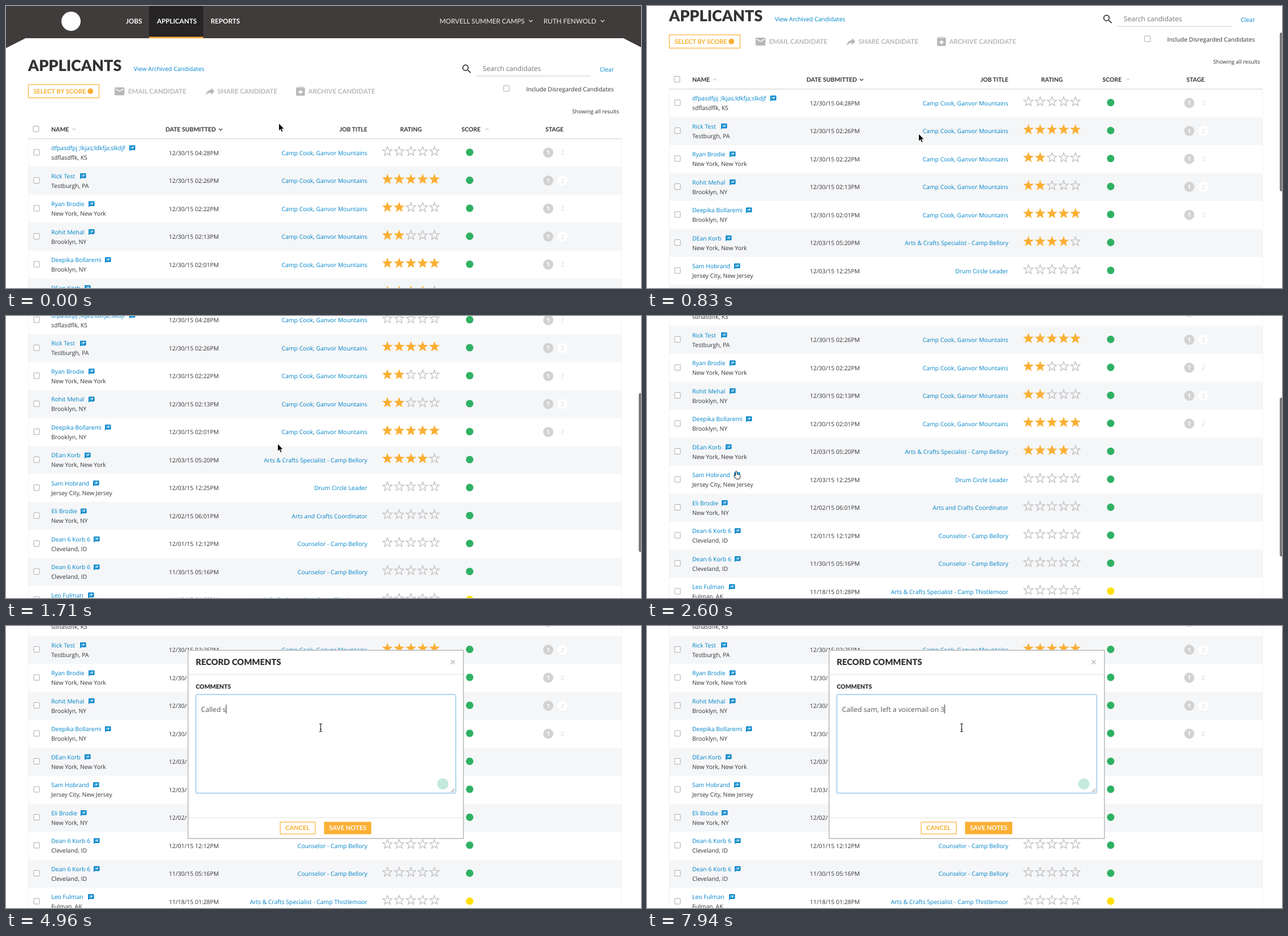
These frames come from a looping animation (1123 px wide and 499 px high, 8 s). An HTML page:

```html
<!DOCTYPE html>
<html lang="en">
<head>
<meta charset="utf-8">
<title>Applicants</title>
<style>
html, body { margin: 0; width: 100%; height: 100%; overflow: hidden; background: #fff; }
svg { display: block; width: 100vw; height: 100vh; }
text { font: 10.44px "Open Sans", sans-serif; fill: #333; white-space: pre; text-rendering: geometricPrecision; }
.link { fill: #0084c9; }
.big { font-size: 12.18px; fill: #777; }
.small { font-size: 9.57px; }
.typed { font-size: 12.18px; fill: #555; }
.h1, .h2, .h3, .nav, .user, .col, .tool, .btn { font-family: Lato, sans-serif; font-weight: 700; }
.h1 { font-size: 27px; font-weight: 900; }
.h2 { font-size: 14.8px; font-weight: 900; }
.h3 { font-size: 10.6px; font-weight: 900; }
.nav { font-size: 11.7px; fill: #fff; }
.user { font-size: 11.7px; font-weight: 400; fill: #eee; }
.col { font-size: 10.5px; }
.tool { font-size: 11.5px; fill: #b8b8b8; }
.btn { font-size: 11.1px; fill: #f9ae2d; }
.num { font-weight: 700; }
.line { fill: none; stroke-width: 1.2; }
</style>
</head>
<body>
<svg viewBox="0 0 1123 499">
  <g id="page"></g>
  <rect id="bar" x="1119" width="8" height="281" rx="3" fill="#7a7a7a"/>
  <g id="modal"></g>
  <g id="cursor">
    <path d="M0 0V13.5l3-2.8 2 4.8 2.3-1-2-4.6H9.5z" stroke="#fff" stroke-width=".8"/>
    <path d="M3.5 8V1.7a1.3 1.3 0 0 1 2.6 0V6l4.6 1q1.6.4 1.4 2.2L11.5 12l-1 2.5H5L1 9.5Q.4 8.5 1.4 8t2.1 1z" fill="#fff" stroke="#222"/>
    <path d="M-2.5-7Q0-7 0-5.5V5.5Q0 7-2.5 7M2.5-7Q0-7 0-5.5M0 5.5Q0 7 2.5 7M-1.5 2.5h3" fill="none" stroke="#222" stroke-width="1.2"/>
  </g>
</svg>
<script>
const $ = id => document.getElementById(id);
const ORANGE = '#fbaf34', BLUE = '#0084c9', GRAY = '#b8b8b8';
const ROW = 49.5, TOP = 235;

const ICON = {
  mail: 'M20 4H4c-1.1 0-2 .9-2 2v12c0 1.1.9 2 2 2h16c1.1 0 2-.9 2-2V6c0-1.1-.9-2-2-2zm0 4l-8 5-8-5V6l8 5 8-5z',
  share: 'M14 9V5l7 7-7 7v-4.1c-5 0-8.5 1.6-11 5.1 1-5 4-10 11-11z',
  archive: 'M20.5 5.2l-1.4-1.7Q18.7 3 18 3H6q-.7 0-1.2.5L3.5 5.2Q3 5.8 3 6.5V19q0 2 2 2h14q2 0 2-2V6.500q0-.7-.5-1.300zM12 17.500L6.500 12H10v-2h4v2h3.500zM5.100 5l.8-1h12l1 1z',
  search: 'M15.500 14h-.8l-.3-.3A6.500 6.500 0 1 0 13.700 14.400l.3.300v.8l5 5L20.500 19zm-6 0a4.500 4.500 0 1 1 0-9 4.500 4.500 0 0 1 0 9z',
  note: 'M20 2H4Q2 2 2 4V22l4-4h14q2 0 2-2V4q0-2-2-2zM8 14H6v-2h2zm0-3H6V9h2zm0-3H6V6h2zm7 6h-5v-2h5zm3-3h-8V9h8zm0-3h-8V6h8z'
};

// name, icon x, city, date, job, rating
const COOK = 'Camp Cook, Ganvor Mountains', CRAFTS = 'Arts & Crafts Specialist - Camp ';
const rows = [
  ['dfpasdfpj ;lkjas;ldkfja;slkdjf', 218, 'sdflasdflk, KS', '12/30/15 04:28PM', COOK, 0],
  ['Rick Test', 131, 'Testburgh, PA', '12/30/15 02:26PM', COOK, 5],
  ['Ryan Brodie', 146, 'New York, New York', '12/30/15 02:22PM', COOK, 2],
  ['Rohit Mehal', 146, 'Brooklyn, NY', '12/30/15 02:13PM', COOK, 2],
  ['Deepika Bollaremi', 175, 'Brooklyn, NY', '12/30/15 02:01PM', COOK, 5],
  ['DEan Korb', 139, 'New York, New York', '12/03/15 05:20PM', CRAFTS + 'Bellory', 4],
  ['Sam Hobrand', 154, 'Jersey City, New Jersey', '12/03/15 12:25PM', 'Drum Circle Leader', 0],
  ['Eli Brodie', 132, 'New York, NY', '12/02/15 06:01PM', 'Arts and Crafts Coordinator', 0],
  ['Dean 6 Korb 6', 155, 'Cleveland, ID', '12/01/15 12:12PM', 'Counselor - Camp Bellory', 0],
  ['Dean 6 Korb 6', 155, 'Cleveland, ID', '11/30/15 05:16PM', 'Counselor - Camp Bellory', 0],
  ['Leo Fulman', 145, 'Fulman, AK', '11/18/15 01:28PM', CRAFTS + 'Thistlemoor', 0]
];

const text = (x, y, s, cls = '', anchor = 'start') =>
  `<text x="${x}" y="${y}" class="${cls}" text-anchor="${anchor}">${s.replace('&', '&amp;')}</text>`;
const rect = (x, y, w, h, fill, more = '') =>
  `<rect x="${x}" y="${y}" width="${w}" height="${h}" fill="${fill}" ${more}/>`;
const dot = (x, y, r, fill) => `<circle cx="${x}" cy="${y}" r="${r}" fill="${fill}"/>`;
const icon = (name, x, y, fill, k = .87) =>
  `<path d="${ICON[name]}" fill="${fill}" fill-rule="evenodd" transform="translate(${x} ${y}) scale(${k})"/>`;
const box = (x, y) => rect(x, y, 10, 10, '#fff', 'rx="1" stroke="#aaa"');
const chevron = (x, y, color, dir = 1) =>
  `<path class="line" stroke="${color}" d="M${x - 3} ${y - 1.5 * dir}l3 ${3 * dir} 3 ${-3 * dir}"/>`;

function star(x, y, on) {
  const R = on ? 10 : 8.6, pts = [];
  for (let i = 0; i < 10; i++) {
    const r = i % 2 ? R * .42 : R, a = i * Math.PI / 5;
    pts.push((x + r * Math.sin(a)).toFixed(2) + ',' + (y - r * Math.cos(a)).toFixed(2));
  }
  return `<polygon points="${pts.join(' ')}" ${on ? `fill="${ORANGE}"` : 'fill="none" stroke="#bbb" stroke-width="1.2"'}/>`;
}

function tableRow([name, iconX, city, date, job, rating], i) {
  const y = TOP + i * ROW;
  let s = i % 2 ? rect(39, y, 1050, ROW, '#f5f6f8') : '';
  s += box(49, y + 19) + text(80, y + 20, name, 'link') + icon('note', iconX - 1, y + 10.5, BLUE, .525);
  s += text(80, y + 37.2, city) + text(288, y + 28.8, date) + text(639, y + 28.8, job, 'link', 'end');
  for (let k = 0; k < 5; k++) s += star(674.5 + k * 20.8, y + 22.3, k < rating);
  s += dot(820, y + 23.8, 6.6, i < 10 ? '#2fb163' : '#ffe000');
  if (i < 5) {
    s += dot(959, y + 24.5, 9, '#d2d2d2') + text(959, y + 28.3, '1', 'num" style="fill:#fff', 'middle');
    s += dot(984, y + 24.5, 9, '#fff') + text(984, y + 28.3, '2', '" style="fill:#d6d6d6', 'middle');
  }
  return s;
}

$('page').innerHTML =
  '<path d="M0 0H1123V73L1092 57H34.500L0 74.500z" fill="#403c3b"/>' +
  rect(253, 0, 96, 54.5, '#262424') + rect(253, 54.5, 96, 2.7, ORANGE) +
  dot(115, 27, 17, '#fff') +
  text(212, 30.5, 'JOBS', 'nav') + text(267, 30.5, 'APPLICANTS', 'nav') + text(362, 30.5, 'REPORTS', 'nav') +
  text(917, 30.5, 'MORVELL SUMMER CAMPS', 'user', 'end') + chevron(928, 26.5, '#eee') +
  text(1044, 30.5, 'RUTH FENWOLD', 'user', 'end') + chevron(1055, 26.5, '#eee') +
  text(39, 114.7, 'APPLICANTS', 'h1') + text(226, 114.7, 'View Archived Candidates', 'link') +
  icon('search', 804.4, 101, '#333') + text(843, 115.3, 'Search candidates', 'big') +
  rect(831, 123.5, 203, 1, '#ccc') + text(1050, 115.5, 'Clear', 'link') +
  rect(39.5, 139, 125, 23.5, '#fff', `stroke="${ORANGE}" stroke-width="1.2"`) +
  text(48.5, 154.6, 'SELECT BY SCORE', 'btn') + dot(149.3, 150.8, 5, ORANGE) +
  icon('mail', 190.3, 140.5, GRAY) + text(216, 155, 'EMAIL CANDIDATE', 'tool') +
  icon('share', 350.4, 140.5, GRAY) + text(374, 155, 'SHARE CANDIDATE', 'tool') +
  icon('archive', 510.4, 140.5, GRAY) + text(534.5, 155, 'ARCHIVE CANDIDATE', 'tool') +
  box(880, 141) + text(920, 151, 'Include Disregarded Candidates') +
  text(1084, 190, 'Showing all results', 'small', 'end') +
  box(48, 212.5) + text(80, 222, 'NAME', 'col') + chevron(120, 218, '#ccc', -1) +
  text(282, 222, 'DATE SUBMITTED', 'col') + chevron(379.5, 218.5, '#333') +
  text(639, 222, 'JOB TITLE', 'col', 'end') + text(697, 222, 'RATING', 'col') +
  text(805.5, 222, 'SCORE', 'col') + chevron(850.5, 218, '#ccc', -1) + text(954, 222, 'STAGE', 'col') +
  rows.map(tableRow).join('') +
  rect(39, 234.5, 1050, 1, '#ccc') + rect(39, 235, .8, 560, '#eee') + rect(1088, 235, .8, 560, '#eee');

$('modal').innerHTML =
  rect(322, 43, 487, 333, '#fff', 'stroke="#c8c8c8" stroke-width="2"') +
  rect(323, 85, 485, 1, '#e3e3e3') + rect(323, 339, 485, 1, '#e3e3e3') +
  text(335.5, 69.3, 'RECORD COMMENTS', 'h2') + text(335.5, 111, 'COMMENTS', 'h3') +
  '<path class="line" stroke="#bbb" style="stroke-width:1.6" d="M786.500 60.500l7 7m0-7l-7 7"/>' +
  rect(336, 121.5, 459, 174, '#fff', 'id="area" rx="1"') +
  '<path d="M787 294l6-6m-2.500 6l2.500-2.500" stroke="#666"/>' +
  '<g id="hint">' +
  text(345, 151.5, 'e.g. Despite having less experience, I think this user would make an excellent', 'big') +
  text(345, 169, 'addition to our team.', 'big') + '</g>' +
  text(345, 151.5, '', 'typed" id="typed') + rect(345, 139, 1, 16, '#333', 'id="caret"') +
  '<circle id="badge" cx="772.500" cy="279.500" r="10" fill="#c6e9dd"/>' +
  rect(485, 347, 62, 21, '#fff', `stroke="${ORANGE}" stroke-width="1.2"`) + text(515.5, 361.3, 'CANCEL', 'btn', 'middle') +
  rect(562.5, 346.500, 83.500, 22, ORANGE) + text(604.3, 361.3, 'SAVE NOTES', 'btn" style="fill:#fff', 'middle');

const NOTE = 'Called sam, left a voicemail on 3';
const FOCUS = 4100;

const scrollKeys = [[0, 0], [440, 14], [530, 41.7], [680, 66], [830, 88], [970, 104], [1120, 119.7],
  [1260, 151], [1410, 187], [1560, 222], [1710, 252.3], [1860, 267]];
// time, number of typed characters
const typeKeys = [[0, 0], [4280, 1], [4370, 2], [4460, 3], [4560, 4], [4660, 5], [4750, 6], [4870, 7], [4960, 8],
  [5040, 10], [5130, 11], [5220, 12], [6000, 13], [6180, 14], [6270, 15], [6350, 17], [6440, 19], [6620, 21],
  [6700, 22], [6790, 24], [7150, 25], [7330, 26], [7420, 27], [7500, 29], [7680, 30], [7770, 31], [7850, 32], [7940, 33]];
// time, x, y, shape (arrow, hand, beam)
const cursorKeys = [[0, 482.5, 207.5, 0], [90, 481.5, 218, 0], [180, 480.5, 226, 0], [1860, 353, 228, 0],
  [2010, 195, 283, 0], [2160, 189, 282, 0], [2250, 180, 280, 0], [2340, 170, 279, 0], [2430, 162, 278, 0],
  [2520, 154, 275, 1], [2600, 153, 274, 1], [2970, 170, 282, 0], [3070, 260, 300, 0], [3180, 430, 335, 0],
  [3280, 519.5, 342, 0], [3750, 523, 333, 0], [3840, 535, 285, 2], [3930, 548, 225, 2], [4010, 554, 190, 2], [4100, 556.5, 180, 2]];

const at = (keys, t) => keys.findLast(k => k[0] <= t);
const clamp = v => Math.max(0, Math.min(1, v));
const show = (el, on) => el.setAttribute('visibility', on ? 'inherit' : 'hidden');
const move = (el, x, y) => el.setAttribute('transform', `translate(${x} ${y})`);

function draw(t) {
  const scroll = at(scrollKeys, t)[1];
  move($('page'), 0, -scroll);
  $('bar').setAttribute('y', scroll * .545 - 1);
  $('bar').setAttribute('opacity', t < 440 ? 0 : 1 - clamp((t - 4500) / 250));

  const rest = 1 - clamp((t - 2820) / 330);
  move($('modal'), 0, -83 * rest * rest);
  $('modal').setAttribute('opacity', clamp((t - 2820) / 170));

  const focused = t >= FOCUS, count = at(typeKeys, t)[1];
  $('area').setAttribute('stroke', focused ? '#8fc3e6' : '#b0b0b0');
  $('area').style.filter = focused ? 'drop-shadow(0 0 1.5px #9fcff0)' : '';
  show($('hint'), !count);
  show($('caret'), focused);
  show($('badge'), count);
  $('typed').textContent = NOTE.slice(0, count);
  $('caret').setAttribute('x', 345 + (count ? $('typed').getComputedTextLength() : 0));

  const [, x, y, shape] = at(cursorKeys, t);
  move($('cursor'), x, y);
  [...$('cursor').children].forEach((el, i) => show(el, i === shape));
}

const start = performance.now();
function frame() {
  draw((performance.now() - start) % 8000);
  requestAnimationFrame(frame);
}
frame();
</script>
</body>
</html>
```
